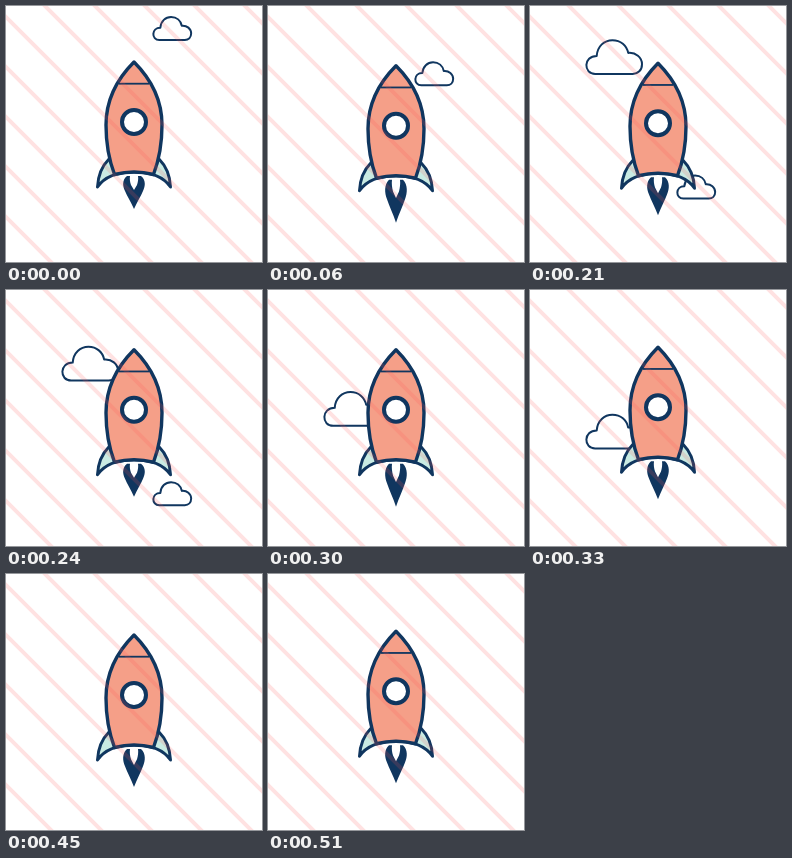
Recreate the animation shown at these times as an HTML page. Size 256 px wide and 256 px high, loop 540 ms.

```html
<!DOCTYPE html>
<html lang="en">
<head>
<meta charset="utf-8">
<title>Rocket</title>
<style>
  html, body { margin: 0; height: 100%; overflow: hidden; background: #fff; }
  svg { display: block; width: 100vw; height: 100vh; }
</style>
</head>
<body>
<svg viewBox="0 0 256 256" stroke="#10365f" stroke-linejoin="round">
  <defs>
    <path id="cloud" vector-effect="non-scaling-stroke" fill="#fff" stroke-width="2"
      d="M7 23.500C-1 23.500-1 11.500 8 11.500C8.500 5 13 1 18.500 1C24 1 28 4.500 29 9.500C34 9 38.200 12.500 38.200 17C38.200 21 35.500 23.500 32 23.500Z"/>
  </defs>
  <use id="small" href="#cloud"/>
  <use id="big" href="#cloud"/>
  <g id="rocket">
    <path fill="#c9ebe3" stroke-width="3"
      d="M91.500 181C92 170 96 160 103 153H153C160 160 164 170 164.500 181C157 170 142 166 128 166S99 170 91.500 181Z"/>
    <path fill="#f59f88" stroke-width="3.400"
      d="M128 56C109 75 100 96 100 119C100 137 103 154 108.500 168.500Q128 163.500 147.500 168.500C153 154 156 137 156 119C156 96 147 75 128 56Z"/>
    <path stroke-width="1.800" d="M113 77.700H143"/>
    <circle cx="128" cy="116" r="12" fill="#fff" stroke-width="4"/>
  </g>
  <path id="flame" fill="#10365f" stroke="none"
    d="M121 0C116 4 116.500 10 119 15C121 20 125 26 128 33C131 26 135 20 137 15C139.500 10 140 4 135 0H132C132.500 3 132 6 131 9L128 14L125 9C124 6 123.500 3 124 0Z"/>
  <path id="stripes" stroke="#f55" stroke-opacity=".17" stroke-width="4"/>
</svg>
<script>
  const LOOP = 540, STEP = 30, BOB = 180, FLICKER = 120, SPEED = 0.755;
  const byId = id => document.getElementById(id);
  const place = (id, transform) => byId(id).setAttribute('transform', transform);
  const swing = (t, period) => (1 - Math.cos(2 * Math.PI * t / period)) / 2;

  let lines = '';
  for (let x = -261; x < 256; x += 50) lines += `M${x - 10}-10l280 280`;
  byId('stripes').setAttribute('d', lines);

  function drift(id, age, life, x, scale) {
    byId(id).style.display = age >= 0 && age < life ? '' : 'none';
    place(id, `translate(${x} ${10 + age * SPEED}) scale(${scale})`);
  }

  function draw(now) {
    const t = Math.floor(now % LOOP / STEP) * STEP;
    const bob = 5 * swing(t, BOB);
    place('rocket', `translate(0 ${bob})`);
    place('flame', `translate(0 ${170 + bob}) scale(1 ${1 + 0.3 * swing(t, FLICKER)})`);
    drift('small', t, 300, 146.2, 1.02);
    drift('big', t - 180, 270, 54.7, 1.5);
    requestAnimationFrame(draw);
  }
  draw(performance.now());
</script>
</body>
</html>
```
